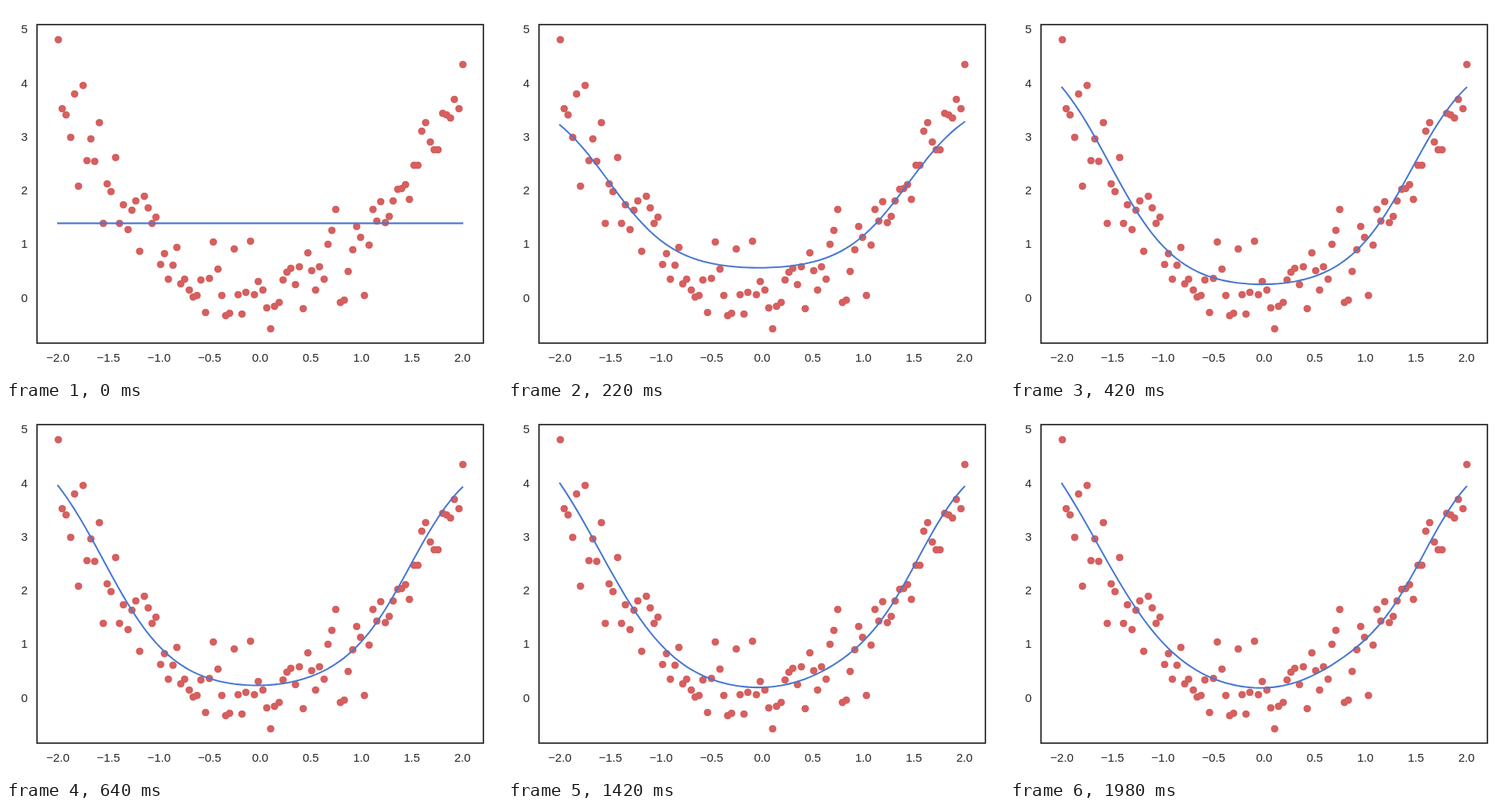
Write an HTML page that moves like this. It is 640 by 480 pixels and loops after 2 s.

```html
<!DOCTYPE html>
<html>
<head>
<meta charset="utf-8">
<style>
html, body { margin: 0; width: 100%; height: 100%; overflow: hidden; background: #fff; }
svg { display: block; }
text { font: 15.28px "Liberation Sans", Arial, sans-serif; fill: #262626; }
</style>
</head>
<body>
<svg width="640" height="480" viewBox="0 0 640 480">
  <g id="dots" fill="#d65f5f"></g>
  <polyline id="curve" fill="none" stroke="#4878cf" stroke-width="2.08" stroke-linecap="square" stroke-linejoin="round"/>
  <rect x="40" y="24" width="576" height="411" fill="none" stroke="#262626" stroke-width="1.74"/>
  <g id="xLabels" text-anchor="middle"></g>
  <g id="yLabels" text-anchor="end"></g>
</svg>
<script>
const LOOP = 2000, STEP = 20, COUNT = 100;
const $ = id => document.getElementById(id);
const px = x => 328 + 130.5 * x;
const py = y => 376.74 - 69.3 * y;
const clamp = u => Math.min(1, Math.max(0, u));
const mix = (a, b, p) => a + (b - a) * p;
const sigmoid = z => 1 / (1 + Math.exp(-z));

// Mersenne Twister, giving doubles in [0, 1)
function twister(seed) {
  const N = 624, s = new Uint32Array(N);
  s[0] = seed;
  for (let i = 1; i < N; i++)
    s[i] = Math.imul(1812433253, s[i - 1] ^ s[i - 1] >>> 30) + i;
  let pos = N;
  function word() {
    if (pos === N) {
      for (let i = 0; i < N; i++) {
        const y = s[i] & 0x80000000 | s[(i + 1) % N] & 0x7fffffff;
        s[i] = s[(i + 397) % N] ^ y >>> 1 ^ (y & 1 ? 0x9908b0df : 0);
      }
      pos = 0;
    }
    let y = s[pos++];
    y ^= y >>> 11;
    y ^= y << 7 & 0x9d2c5680;
    y ^= y << 15 & 0xefc60000;
    return (y ^ y >>> 18) >>> 0;
  }
  return () => {
    const high = word() >>> 5, low = word() >>> 6;
    return (high * 2 ** 26 + low) / 2 ** 53;
  };
}

// Normal deviates by the polar method, two per draw
function normals(random) {
  let spare = null;
  return () => {
    if (spare !== null) {
      const g = spare;
      spare = null;
      return g;
    }
    let a, b, r;
    do {
      a = 2 * random() - 1;
      b = 2 * random() - 1;
      r = a * a + b * b;
    } while (r >= 1 || r === 0);
    const f = Math.sqrt(-2 * Math.log(r) / r);
    spare = f * a;
    return f * b;
  };
}

// Noisy parabola
const noise = normals(twister(1));
const xs = Array.from({ length: COUNT }, (_, i) => -2 + 4 * i / (COUNT - 1));
const ys = xs.map(x => x * x + noise() / 2);
const mean = ys.reduce((a, b) => a + b) / COUNT;
const snap = v => Math.floor(v + .5) + .5;
$('dots').innerHTML = xs.map((x, i) =>
  `<circle cx="${snap(px(x) - .1)}" cy="${snap(py(ys[i]))}" r="4.86"/>`).join('');

const label = (x, y, s) => `<text x="${x}" y="${y}">${s}</text>`;
for (let x = -2; x <= 2; x += .5)
  $('xLabels').innerHTML += label(px(x), 459, x.toFixed(1).replace('-', '\u2212'));
for (let y = 0; y <= 5; y++)
  $('yLabels').innerHTML += label(28, Math.round(py(y) + 5), y);

// Three sigmoid units whose weights drift as p goes from 0 to 1
function fit(x, p) {
  const unit = (height, gain, shift, z) =>
    mix(...height, p) * sigmoid(mix(...gain, p) * (z - mix(...shift, p)));
  return mix(.18, -.05, p)
    + unit([4.55, 5.85], [3.05, 2.3], [1.515, 1.65], -x)
    + unit([4.4, 3.8], [3.1, 3.6], [1.445, 1.59], x)
    + unit([0, .9], [3.5, 3.5], [.6, .6], x);
}

// A flat line tilts a little, bends into a bowl, then settles slowly
function model(x, t) {
  const tilt = .036 * clamp(t / 140) ** 2;
  const u = clamp((t - 140) / 120), bend = u * u * (3 - 2 * u);
  const drift = clamp((t - 280) / 1700) ** .8;
  return mix(mean + tilt * x, fit(x, drift), bend);
}

function draw() {
  const t = Math.floor(performance.now() % LOOP / STEP) * STEP;
  $('curve').setAttribute('points', xs.map(x => `${px(x)},${py(model(x, t))}`).join(' '));
  requestAnimationFrame(draw);
}
draw();
</script>
</body>
</html>
```
